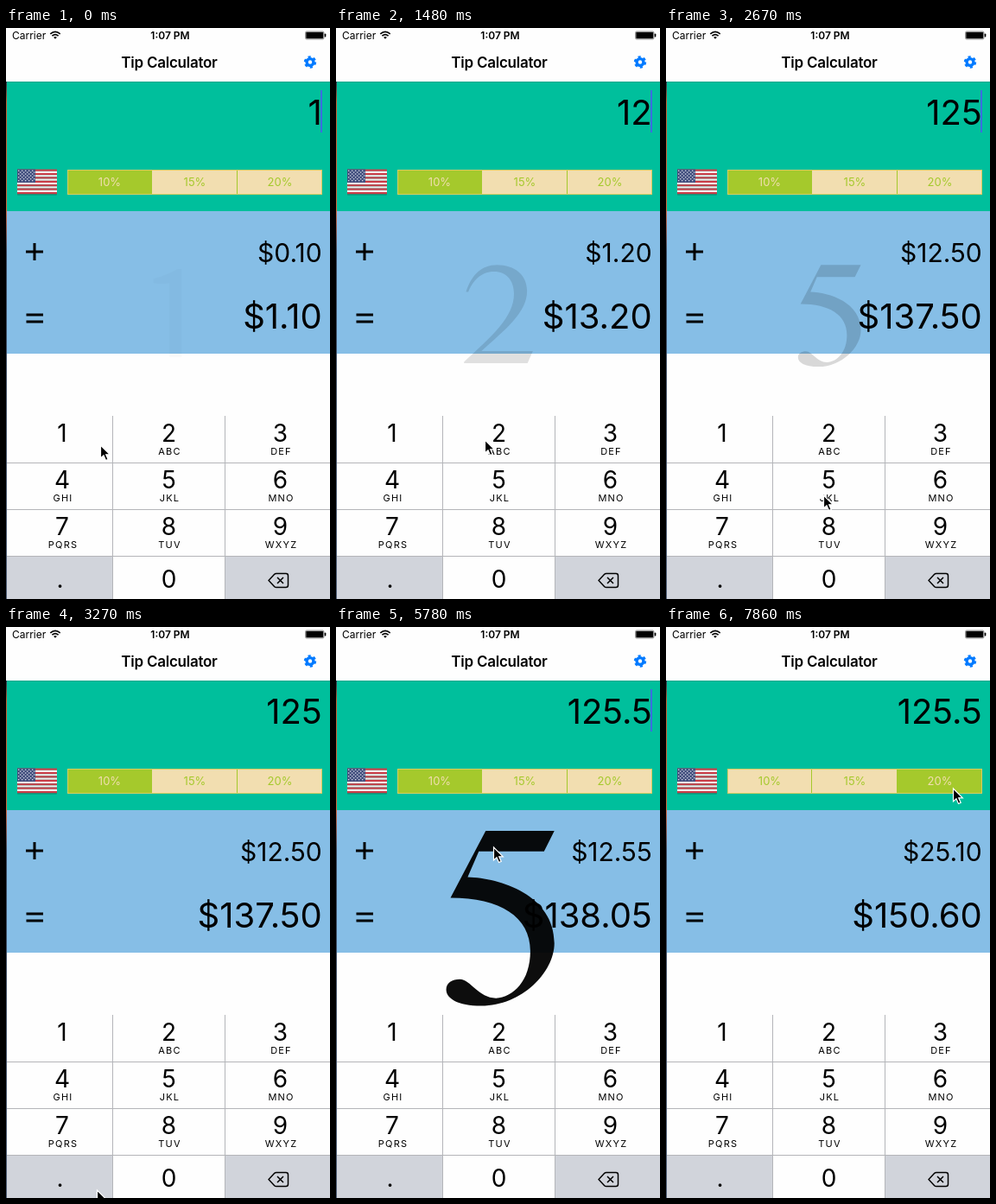
Recreate the animation shown at these times as an HTML page. Size 375 by 661 pixels, loop 8 s.

```html
<!DOCTYPE html>
<html lang="en">
<head>
<meta charset="utf-8">
<title>Tip Calculator</title>
<style>
  html, body { margin: 0; width: 100%; height: 100%; overflow: hidden; background: #fefefe; }
  svg { display: block; width: 375px; height: 661px; font-family: Inter, Roboto, sans-serif; }
  .mid { text-anchor: middle; }
  .amount { text-anchor: end; }
  .letters { font-size: 11px; letter-spacing: 1.2px; }
</style>
</head>
<body>
<svg viewBox="0 0 375 661">
  <defs>
    <linearGradient id="edge" x2="0" y2="1">
      <stop offset="0" stop-color="#27354a"/>
      <stop offset=".04" stop-color="#c5562f"/>
      <stop offset=".25" stop-color="#d0603a"/>
      <stop offset=".33" stop-color="#354357"/>
      <stop offset="1" stop-color="#4a5a72"/>
    </linearGradient>
  </defs>
  <rect width="375" height="661" fill="#fefefe"/>

  <!-- Status and title bars -->
  <text x="7" y="13" font-size="12">Carrier</text>
  <g fill="none" stroke="#000" stroke-width="1.7">
    <path d="M51.3 6.8Q57 1.9 62.7 6.8M53.4 9.1Q57 6 60.6 9.1"/>
    <path d="M57 12.8L55.1 10.7Q57 9.3 58.9 10.7Z" fill="#000" stroke="none"/>
  </g>
  <text class="mid" x="190" y="13" font-size="12" font-weight="600">1:07 PM</text>
  <rect x="346.5" y="4" width="21.5" height="9" rx="1.5" fill="none" stroke="#555" stroke-width=".6"/>
  <rect x="347.3" y="4.8" width="20" height="7.4" rx=".8"/>
  <rect x="368.7" y="6.5" width="1.6" height="4" rx=".8"/>
  <text class="mid" x="189" y="46" font-size="17" font-weight="600" letter-spacing="-.25">Tip Calculator</text>
  <g fill="none" stroke="#007aff" transform="translate(352 39.5)">
    <circle r="3.9" stroke-width="3.4"/>
    <circle r="6" stroke-width="2.4" stroke-dasharray="3.14 3.14"/>
  </g>

  <!-- Panels -->
  <rect y="62" width="1" height="599" fill="url(#edge)"/>
  <rect x="1" y="62" width="374" height="150" fill="#00bf9c"/>
  <rect x="1" y="62" width="374" height="1" fill="#08a78c"/>
  <rect x="1" y="212" width="374" height="165" fill="#86bee6"/>
  <g id="flag"></g>
  <g id="segments"></g>
  <path d="M23 259H43M33 249V269M23.5 332H43M23.5 340H43" stroke="#000" stroke-width="3"/>
  <text id="bill" class="amount" x="365.7" y="112" font-size="40"></text>
  <text id="tip" class="amount" x="365.7" y="271" font-size="30"></text>
  <text id="total" class="amount" x="365.7" y="348" font-size="40"></text>
  <rect id="caret" x="364" y="72" width="2" height="49" fill="#3c6ee0"/>
  <path id="ghost"/>

  <g id="keypad"></g>
  <path d="M123.5 449V661M253.5 449V661M1 503.5H375M1 557.5H375M1 611.5H375" stroke="#b4b5b9"/>
  <g fill="none" stroke="#000" stroke-width="1.5" stroke-linejoin="round">
    <path d="M304 639.5L310.5 632.6Q311.5 631.5 313 631.5H324Q326.5 631.5 326.5 634V645Q326.5 647.5 324 647.5H313Q311.5 647.5 310.5 646.4Z"/>
    <path d="M314 636L321 643M321 636L314 643"/>
  </g>
  <path id="pointer" d="M.5 0V15L4 11.8L6.5 17.5L9.2 16.4L6.7 10.8H11.3Z" stroke="#fff" stroke-width="1.2"/>
</svg>
<script>
const LOOP = 8000;
const $ = id => document.getElementById(id);
const rect = (x, y, w, h, fill, extra = '') =>
  `<rect x="${x}" y="${y}" width="${w}" height="${h}" fill="${fill}" ${extra}/>`;

// Large digits that shrink and fade, centred on the origin
const GLYPHS = {
  1: 'M-36-82Q-6-90 18-104H28V96H0V-72Q-16-70-36-72Z',
  2: 'M-69-48C-58-83-37-104-5-104C32-104 57-83 57-50C57-5 11 30-37 74H69L58 99H-73V96C-16 44 30 4 30-44C30-72 14-90-11-90C-37-90-55-72-64-48Z',
  5: 'M-17-101H63L51-77H-25L-38-47C0-46 63-26 63 30C63 64 25 103-22 103C-50 103-63 94-63 84C-63 76-56 72-47 72C-35 72-25 94-5 94C15 93 35 74 35 39C35-1 0-23-58-23Z',
  '.': 'M-14 88a14 14 0 1 0 28 0a14 14 0 1 0-28 0Z'
};

const TYPED = [['1', -361], ['2', 1178], ['5', 2380], ['.', 3650], ['5', 5717]];
const RATES = [[10, 0], [15, 6550], [20, 7520]];
const POINTER = [
  [0, 109, 483], [150, 109, 483], [750, 172, 484], [1150, 173, 485], [1480, 172, 477],
  [2050, 184, 545], [2400, 184, 546], [2670, 182, 541], [3270, 105, 652], [3420, 87, 644],
  [3720, 87, 640], [4300, 180, 520], [4450, 179, 518], [5550, 180, 520], [5780, 182, 255],
  [6350, 225, 186], [7050, 225, 186], [7450, 332, 187], [LOOP, 332, 187]
];

const easeInOut = p => p < .5 ? 2 * p * p : 1 - 2 * (1 - p) ** 2;
const money = n => '$' + n.toFixed(2);

function buildFlag() {
  const top = 163.6, stripe = 28.6 / 13;
  let out = rect(13, top + 1, 46, 29.2, '#00705c', 'opacity=".45" rx="1"');
  for (let i = 0; i < 13; i++)
    out += rect(13, top + i * stripe, 46, stripe, i % 2 ? '#f4eeee' : '#cb3d48');
  out += rect(13, top, 21, 7 * stripe, '#43507f');
  for (let row = 0; row < 7; row++)
    for (let col = 0; col < 5; col++)
      out += rect(14 + col * 4 + row % 2 * 2, top + 1 + row * 1.9, 1.3, 1.3, '#d5d8e6');
  $('flag').innerHTML = out;
}

function buildSegments() {
  const edges = [71.5, 168.5, 267.5, 365.5];
  $('segments').innerHTML = RATES.map(([rate], i) =>
    rect(edges[i], 164.5, edges[i + 1] - edges[i], 28, '', 'stroke="#a5c92c"') +
    `<text class="mid" x="${120 + i * 98.5}" y="183" font-size="13">${rate}%</text>`).join('') +
    rect(71.5, 164.5, 294, 28, 'none', 'stroke="#d6cc62"');
}

function buildKeypad() {
  const letters = ['', 'ABC', 'DEF', 'GHI', 'JKL', 'MNO', 'PQRS', 'TUV', 'WXYZ'];
  const lefts = [1, 124, 254], widths = [122, 129, 121], centers = [65, 188.5, 317.5];
  $('keypad').innerHTML = [...'123456789.0<'].map((key, i) => {
    const col = i % 3, top = 450 + 54 * Math.floor(i / 3);
    const x = key === '.' ? 62.5 : centers[col];
    const y = i < 9 ? top + 29 : 648;
    const label = key === '<' ? '' : `<text class="mid" x="${x}" y="${y}" font-size="28">${key}</text>`;
    return rect(lefts[col], top, widths[col], 53, '', `data-key="${key}"`) + label +
      `<text class="mid letters" x="${x + 1}" y="${top + 44}">${letters[i] || ''}</text>`;
  }).join('');
}

function pointerAt(t) {
  const i = POINTER.findIndex(p => p[0] > t);
  const [t0, x0, y0] = POINTER[i - 1], [t1, x1, y1] = POINTER[i];
  const k = easeInOut((t - t0) / (t1 - t0));
  return [x0 + (x1 - x0) * k, y0 + (y1 - y0) * k];
}

function render(t) {
  const entered = TYPED.filter(([, at]) => at <= t);
  const [lastKey, lastTime] = entered[entered.length - 1];
  const text = entered.map(([key]) => key).join('');
  const rate = RATES.filter(([, at]) => at <= t).pop()[0];
  const bill = parseFloat(text), tip = bill * rate / 100;
  $('bill').textContent = text;
  $('tip').textContent = money(tip);
  $('total').textContent = money(bill + tip);
  $('caret').style.opacity = (t - lastTime) % 1300 < 750 ? 1 : 0;

  const fade = 1 - easeInOut(Math.min(1, (t - lastTime) / 400));
  $('ghost').setAttribute('d', GLYPHS[lastKey]);
  $('ghost').setAttribute('transform',
    `translate(${189 + 1.2 * fade} ${332 + 4.5 * fade}) scale(${.5 + .52 * fade})`);
  $('ghost').style.opacity = fade;

  const pressed = TYPED.find(([, at]) => t > at - 170 && t < at - 40);
  for (const cell of document.querySelectorAll('[data-key]')) {
    const key = cell.dataset.key;
    const gray = '.<'.includes(key) !== Boolean(pressed && pressed[0] === key);
    cell.setAttribute('fill', gray ? '#d1d4db' : '#fefefe');
  }

  RATES.forEach(([value], i) => {
    const box = $('segments').children[i * 2], label = box.nextSibling;
    box.setAttribute('fill', value === rate ? '#a5c92c' : '#f2deb0');
    label.setAttribute('fill', value === rate ? '#f2deb0' : '#a5c92c');
  });
  $('pointer').setAttribute('transform', `translate(${pointerAt(t)})`);
}

buildFlag();
buildSegments();
buildKeypad();
const start = performance.now();
function tick() {
  render((performance.now() - start) % LOOP);
  requestAnimationFrame(tick);
}
tick();
</script>
</body>
</html>
```
